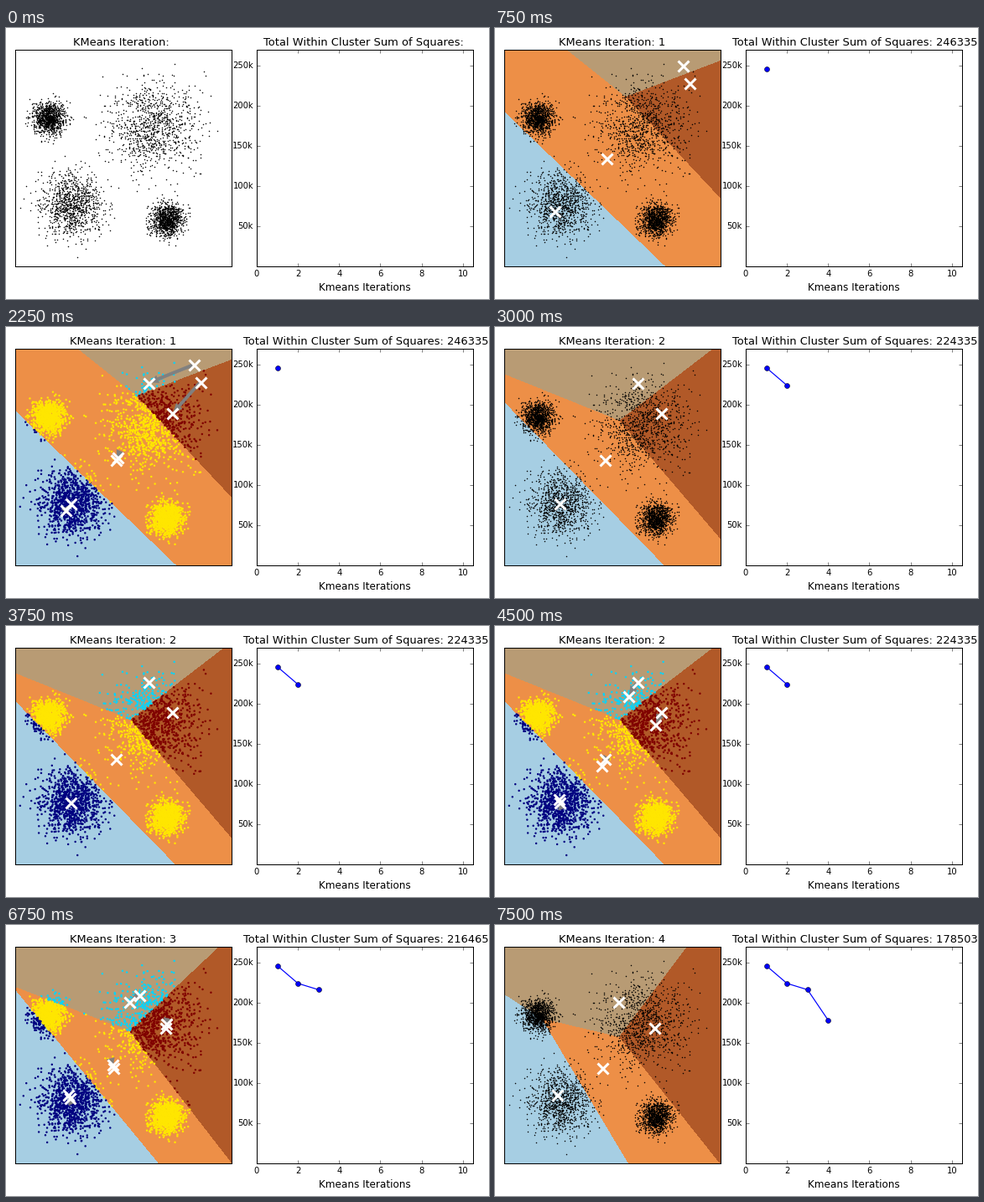
Animation, 576 px wide and 324 px high, one loop 8 s. Source, as a matplotlib script:

```python
import numpy as np
import matplotlib.pyplot as plt
from matplotlib.animation import FuncAnimation
from matplotlib.colors import LinearSegmentedColormap
from matplotlib.patches import Polygon

W, H, DPI = 576, 324, 72
LEFT, TOP, SIZE_X, SIZE_Y = 11, 26, 258, 259
RIGHT, BOTTOM = LEFT + SIZE_X, TOP + SIZE_Y
K = 4                 # number of clusters
STEP = 250            # ms per frame
HOLD = 3              # frames per stage
FRAMES = 32

plt.style.use("classic")
plt.rcParams.update({
    "font.family": "DejaVu Sans",
    "figure.facecolor": "white",
    "savefig.facecolor": "white",
    "xtick.labelsize": 10,
    "ytick.labelsize": 10,
})

# Blobs: centre x, centre y, spread; all in stage pixels
BLOBS = [(51, 108, 9.6), (176, 117, 26.5), (78, 212, 18.8), (192, 229, 9.7)]
SEEDS = [(71.2, 219), (224, 45), (132.8, 156.3), (232, 65.5)]
TOTALS = [246335, 224335, 216465, 178503]

levels = np.linspace(0, 1, K)
paired = LinearSegmentedColormap.from_list("paired", plt.cm.Paired.colors)
region_rgb = paired(levels)
point_rgb = plt.cm.jet(levels)


def make_points(n=1000):
    rng = np.random.default_rng(7)
    parts = []
    for cx, cy, spread in BLOBS:
        radius = spread * np.sqrt(-2 * np.log(np.linspace(0.004, 1, n)))
        angle = rng.uniform(0, 2 * np.pi, n)
        parts.append(np.column_stack([cx + radius * np.cos(angle),
                                      cy + radius * np.sin(angle)]))
    return rng.permutation(np.concatenate(parts))


def nearest(x, y, centres):
    # The data axes are scaled slightly differently in x and y
    dist = [(x - cx) ** 2 + 1.02 * (y - cy) ** 2 for cx, cy in centres]
    return np.argmin(dist, axis=0)


def kmeans(points, centres, rounds):
    """Centres and point labels of every round."""
    history = []
    for _ in range(rounds):
        labels = nearest(*points.T, centres)
        history.append((np.array(centres), labels))
        centres = [points[labels == k].mean(axis=0) for k in range(K)]
    return history


def arrow_shape(start, end, tail=3.5, head=9, head_len=10, gap=2):
    along = (end - start) / np.hypot(*(end - start))
    side = np.array([-along[1], along[0]])
    start, end = start + gap * along, end - gap * along
    neck = end - along * head_len
    wings = [neck + side * head / 2, end, neck - side * head / 2]
    if np.dot(neck - start, along) <= 0:
        return wings
    t = side * tail / 2
    return [start + t, neck + t, *wings, neck - t, start - t]


fig = plt.figure(figsize=(W / DPI, H / DPI), dpi=DPI)


def panel(x):
    return fig.add_axes([x / W, 1 - BOTTOM / H, SIZE_X / W, SIZE_Y / H])


def label(y, size, text="", x=0):
    return fig.text(x / W, 1 - y / H, text, fontsize=size,
                    ha="center", va="baseline")


points = make_points()
gx, gy = np.meshgrid(np.arange(LEFT, RIGHT + 1), np.arange(TOP, BOTTOM + 1))
rounds = kmeans(points, SEEDS, len(TOTALS))
regions = [region_rgb[nearest(gx, gy, centres)] for centres, _ in rounds]

# Left panel: clusters
ax = panel(LEFT)
ground = ax.imshow(regions[0], aspect="auto", interpolation="nearest",
                   extent=(LEFT - 0.5, RIGHT + 0.5, BOTTOM + 0.5, TOP - 0.5))
black, = ax.plot(*points.T, "k.", markersize=2, zorder=2)
tinted = ax.scatter(*points.T, s=6, linewidths=0, zorder=2)
arrows = [ax.add_patch(Polygon(np.eye(3, 2), fc="gray", ec="gray",
                               lw=0.5, zorder=3)) for _ in range(K)]
crosses, = ax.plot([], [], "wx", markersize=13, markeredgewidth=3,
                   markeredgecolor="white", zorder=4)
ax.set(xlim=(LEFT, RIGHT), ylim=(BOTTOM, TOP), xticks=[], yticks=[])

# Right panel: sum of squares
chart = panel(299)
curve, = chart.plot([], [], "bo-", linewidth=1.2, markersize=6)
ticks = range(50, 251, 50)
chart.set(xlim=(0, 10.5), ylim=(0, 270), xticks=range(0, 11, 2), yticks=ticks)
chart.set_yticklabels([f"{t}k" for t in ticks])
label(314, 12, "Kmeans Iterations", 428)

left_title = label(21, 13)
right_title = label(21, 13)


def set_title(title, text, value, centre):
    # Without a value the trailing blank still takes up room
    title.set_text(f"{text} {value}".rstrip())
    title.set_x((centre if value else centre - 4.5 / 2) / W)


def draw(frame):
    stage = frame // HOLD
    started = stage > 0
    step, phase = divmod(max(stage - 1, 0), 3)
    coloured = phase > 0
    moving = phase == 2
    centres, labels = rounds[step]

    ground.set_visible(started)
    ground.set_data(regions[step])
    black.set_visible(not coloured)
    tinted.set_visible(coloured)
    tinted.set_facecolor(point_rgb[labels])

    shown = centres
    for arrow in arrows:
        arrow.set_visible(moving)
    if moving:
        target = rounds[step + 1][0]
        shown = np.concatenate([centres, target])
        for arrow, a, b in zip(arrows, centres, target):
            arrow.set_xy(arrow_shape(a, b))
    crosses.set_data(*shown.T)
    crosses.set_visible(started)

    count = step + 1 if started else 0
    curve.set_data(range(1, count + 1), [t / 1000 for t in TOTALS[:count]])
    set_title(left_title, "KMeans Iteration:", count or "", 139.5)
    set_title(right_title, "Total Within Cluster Sum of Squares:",
              TOTALS[step] if started else "", 429)
    return []


anim = FuncAnimation(fig, draw, frames=FRAMES, interval=STEP,
                     init_func=lambda: draw(0), repeat=True, repeat_delay=0)
plt.show()
```
